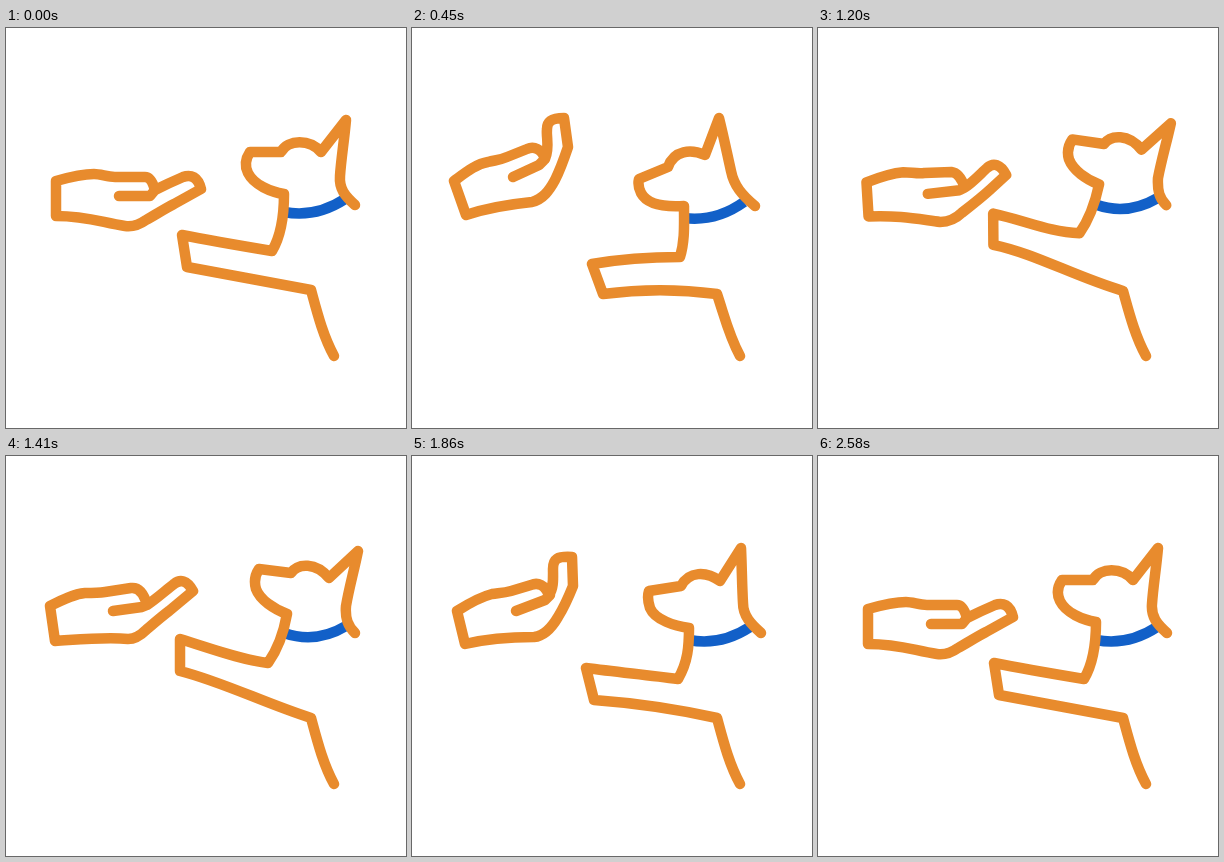
Recreate the animation shown at these times as an HTML page. Size 400 by 400 pixels, loop 2610 ms.

```html
<!DOCTYPE html>
<html lang="en">
<head>
<meta charset="utf-8">
<title>Dog and hand</title>
<style>
html, body { margin: 0; width: 100%; height: 100%; overflow: hidden; background: #fff; }
svg { display: block; width: 100%; height: 100%; }
path { fill: none; stroke: #e88b2d; stroke-width: 10.5; stroke-linecap: round; stroke-linejoin: round; }
#collar { stroke: #1260c8; stroke-linecap: butt; }
</style>
</head>
<body>
<svg viewBox="0 0 400 400">
  <path id="collar"/>
  <path id="dog"/>
  <path id="hand"/>
</svg>
<script>
const LOOP = 2610, STEP = 30;

const hand = {
  flat: 'M50 153C64 149 78 146 88 146C95 146 101 149 109 149L139 149C144 149 147 155 149 162C159 157 170 152 177 149C185 146 192 149 195 161L168 176C160 180 149 187 140 192C133 197 126 199 119 198C97 195 82 188 50 188ZM113 168L144 168L149 162',
  bent: 'M42 153C53 145 64 136 76 134C84 132 88 132 95 129L115 121C122 118 130 121 133 131C138 119 134 110 135 101C135 93 140 90 152 90L156 119C153 128 148 142 143 152C137 163 131 171 120 174C100 176 78 179 54 187ZM101 149L127 137L133 131',
  falling: 'M48 155C60 150 73 144 84 143C92 143 97 144 104 143L130 140C136 140 141 145 144 152C152 147 157 137 162 129C167 122 173 124 181 129L174 148C170 155 157 168 149 176C141 185 132 191 121 191C100 190 80 189 52 189ZM109 163L140 157L145 152',
  rising: 'M44 150C56 144 68 138 79 137C87 137 92 137 99 136L125 132C133 131 138 138 141 149C149 144 160 134 168 128C174 123 181 124 187 135L163 155C155 161 147 168 140 174C134 180 129 183 122 183C100 181 80 183 49 185ZM107 155L136 151L141 149',
  dropping: 'M45 155C56 148 68 141 80 138C87 137 92 137 99 135L119 129C126 126 133 129 137 139C142 132 141 122 141 113C141 103 145 100 160 101L161 130C157 140 151 153 146 161C139 173 132 180 122 181C100 181 78 182 53 188ZM104 155L133 144L138 139',
  settling: 'M49 155C62 150 74 146 86 145C94 145 100 147 107 146L134 145C140 146 144 151 147 160C155 155 163 145 168 140C174 134 181 136 187 146L174 160C166 168 155 177 145 185C138 192 131 195 122 195C98 192 82 188 51 189ZM110 167L142 163L147 160'
};

const dog = {
  rest: 'M328 328C317 308 311 284 305 262C264 254 222 247 181 239L176 207C206 213 236 218 266 223C275 208 278 190 278 166C265 164 248 157 242 145C238 137 240 130 244 124L275 124C282 111 304 111 315 124L340 92C338 114 335 132 334 148C333 161 339 168 349 177',
  forward: 'M328 328C317 308 313 290 305 266C267 261 229 261 191 266L180 236C209 231 238 229 268 229C273 213 272 196 272 178C256 179 236 178 229 165C226 159 226 155 227 151L256 139C262 122 279 121 293 127L307 90C312 110 316 130 319 143C322 158 330 167 343 178',
  low: 'M328 328C317 308 312 290 305 269C252 268 239 269 201 288L183 262C219 240 230 245 266 226C272 210 272 193 273 175C258 175 240 172 233 160C230 154 230 150 230 146L260 136C266 121 282 120 296 126L311 91C315 112 319 132 321 145C325 160 331 168 343 178',
  raised: 'M328 328C317 308 311 284 305 262C258 247 217 226 174 215L174 183C204 192 232 203 262 207C272 193 278 175 281 158C268 153 254 144 250 133C248 126 249 119 253 113L285 117C292 107 310 106 323 122L352 95C348 115 343 132 340 150C339 163 342 170 349 177',
  lowering: 'M328 328C317 308 311 284 305 262C264 253 223 247 182 244L174 212C205 216 235 219 266 223C276 206 277 190 277 172C263 170 243 164 238 152C236 146 235 141 237 135L269 130C277 115 294 115 308 125L329 92C330 115 330 130 331 147C331 160 339 168 349 177',
  settling: 'M328 328C317 308 311 284 305 262C264 253 223 247 182 243L176 211C206 215 236 219 266 223C275 208 278 190 278 167C265 165 248 158 242 146C239 139 240 132 243 127L275 125C282 111 300 112 313 123L338 92C336 114 334 132 334 148C333 161 339 168 349 177'
};

const collar = {
  rest: 'M278 184Q310 190 339 171',
  forward: 'M272 190Q304 194 332 174',
  low: 'M273 188Q302 191 332 173',
  raised: 'M278 177Q310 188 340 170',
  lowering: 'M277 184Q309 190 338 171'
};
collar.settling = collar.rest;

const numbers = d => d.match(/\d+/g).map(Number);
const beyond = (a, b, k) => a.map((v, i) => v + k * (v - b[i]));

// Smooth cyclic curve through [time, values] keys
function track(id, template, keys) {
  const path = document.getElementById(id), n = keys.length;
  const key = i => {
    const turn = Math.floor(i / n), [time, values] = keys[i - turn * n];
    return [time + turn * LOOP, values];
  };
  return t => {
    let k = n - 1;
    while (keys[k][0] > t) k--;
    const [[t0, a], [t1, b], [t2, c], [t3, d]] = [k - 1, k, k + 1, k + 2].map(key);
    const h0 = t1 - t0, h = t2 - t1, h2 = t3 - t2;
    const u = (t - t1) / h, v = 1 - u;
    let i = 0;
    path.setAttribute('d', template.replace(/\d+/g, () => {
      const s0 = (b[i] - a[i]) / h0, s = (c[i] - b[i]) / h, s2 = (d[i] - c[i]) / h2;
      const m1 = (s0 * h + s * h0) / (h0 + h), m2 = (s * h2 + s2 * h) / (h + h2);
      const value = b[i] * v * v * (1 + 2 * u) + c[i] * u * u * (3 - 2 * u)
        + h * u * v * (m1 * v - m2 * u);
      i++;
      return value.toFixed(2);
    }));
  };
}

function dogTrack(id, shape) {
  const pose = {};
  for (const name in shape) pose[name] = numbers(shape[name]);
  return track(id, shape.rest, [
    [0, pose.rest], [450, pose.forward], [960, pose.low],
    [1260, beyond(pose.raised, pose.lowering, 0.25)], [1410, pose.raised],
    [1860, pose.lowering], [2220, pose.settling], [2580, pose.rest]
  ]);
}

const handKeys = [
  [0, 'flat'], [270, 'rising'], [450, 'bent'], [960, 'falling'], [1150, 'settling'],
  [1410, 'rising'], [1660, 'bent'], [1860, 'dropping'], [2220, 'settling'], [2580, 'flat']
].map(([time, name]) => [time, numbers(hand[name])]);

const tracks = [
  track('hand', hand.flat, handKeys),
  dogTrack('dog', dog),
  dogTrack('collar', collar)
];

const start = performance.now();
function draw() {
  const t = Math.floor((performance.now() - start) % LOOP / STEP) * STEP;
  tracks.forEach(show => show(t));
  requestAnimationFrame(draw);
}
draw();
</script>
</body>
</html>
```
